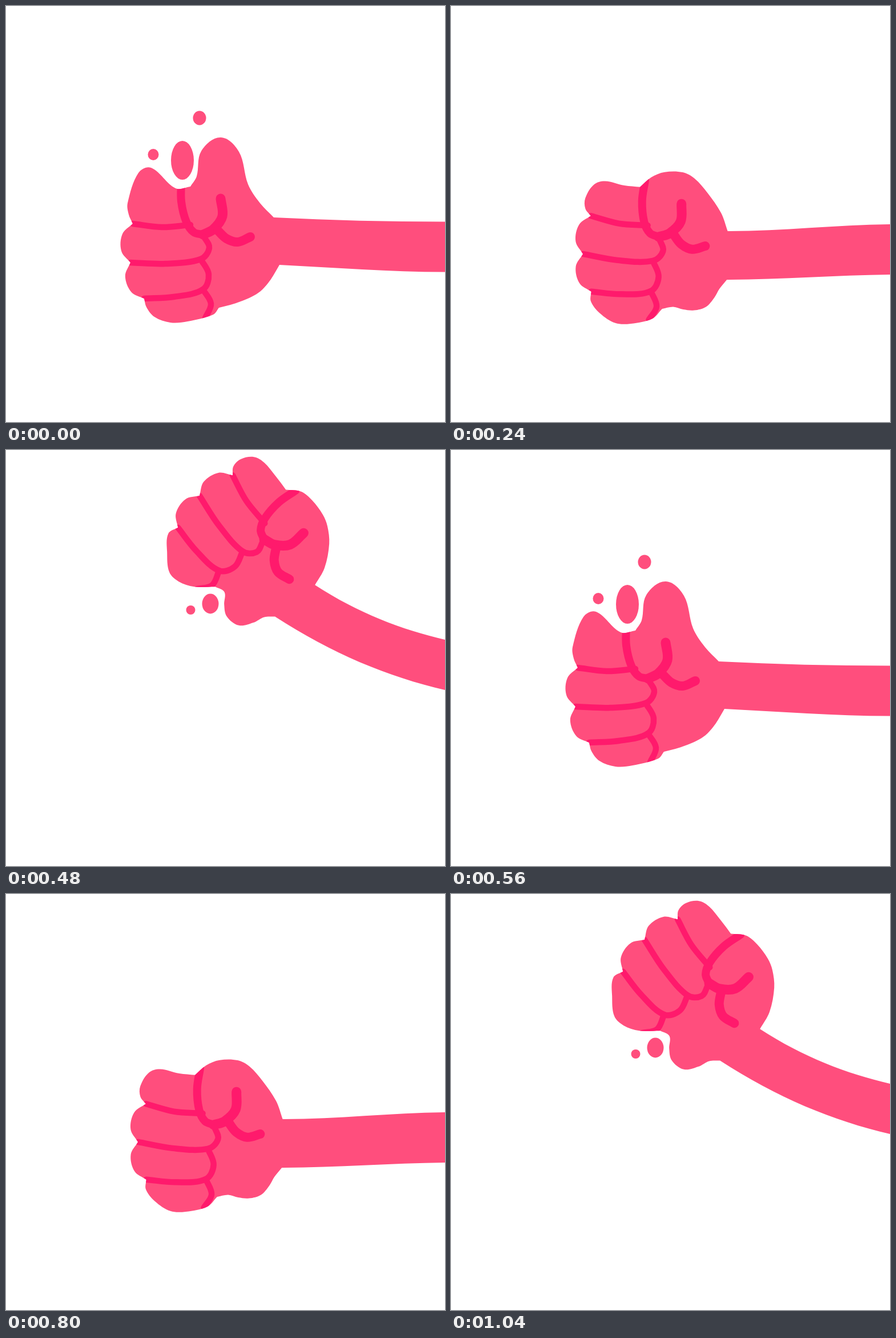
Write an HTML page with a canvas that moves like this. It is 769 px wide and 728 px high and loops after 1.12 s.

```html
<!DOCTYPE html>
<html lang="en">
<head>
<meta charset="utf-8">
<title>Shaking fist</title>
<style>
  html, body { margin: 0; width: 100%; height: 100%; overflow: hidden; background: #fff; }
  canvas { display: block; }
</style>
</head>
<body>
<canvas id="stage" width="769" height="728"></canvas>
<script>
const ctx = document.getElementById('stage').getContext('2d');
const W = 769, H = 728, STEP = 80, ARM = 44;
const SKIN = '#ff4e7d', CREASE = '#ff1a6c';

const lerp = (a, b, k) => a + (b - a) * k;
const between = (a, b, k) => [lerp(a[0], b[0], k), lerp(a[1], b[1], k)];
const shift = ([x, y], dx, dy) => [x + dx, y + dy];

// The fist is described around the root of the thumb.
// Soft points are [x, y, dx, dy]: a place and how far it stretches.
const THUMB = [
  [117, -27, 7, -3], [102, -58, -2, 3], [72, -89, 7, 1], [45, -104, 18, -41],
  [24, -109, 7, -61], [-7, -108, 4, -38], [-31, -101, 20, -1], [-49, -81, 27, -3]
];
const INDEX = [
  [-77, -80, 29, -1], [-110, -77, 19, -40], [-128, -68, 15, -40],
  [-138, -47, 6, -8], [-135, -29, 5, -6]
];
const PINKY = [
  [-99, 127, -5, 5], [-85, 144, 6, 8], [-57, 154, 9, 15],
  [-27, 152, 2, 13], [18, 140, -20, 8], [28, 128, -9, -10]
];
const HEEL = [
  [48, 123, -12, -13], [66, 117, -12, 6], [85, 109, -12, 22], [101, 99, -3, 24],
  [114, 85, -5, 14], [123, 72, -11, 6], [134, 53, -12, 9]
];
const stretch = (points, k) => points.map(([x, y, dx, dy]) => [x + dx * k, y + dy * k]);

// Finger creases run from the knuckles on the outline to the folds in the palm.
const KNUCKLES = [[-123, -19], [-127, 49], [-103, 112]];
const FOLDS = [[-22, -17], [-4, 43], [0, 96]];
const PINKY_END = [4, 146];

function fingertip(a, b) {
  const dx = b[0] - a[0], dy = b[1] - a[1], d = 17 / Math.hypot(dx, dy);
  return [...[0.28, 0.72].map(k => shift(between(a, b, k), -dy * d, dx * d)), b];
}

const hook = (a, b) => [a, shift(between(a, b, 0.5), 12, 0), b];
const fingerCreases = KNUCKLES.map((k, i) => {
  const fold = FOLDS[i];
  const line = [k, shift(between(k, fold, 0.5), 0, 5)];
  return [...line, ...(i ? hook(fold, i > 1 ? FOLDS[1] : [2, 4]) : [fold])];
});

const CREASES = [
  { width: 14, points: [[-38, -94], [-38, -58], [-29, -22], [-16, -4], [0, 0]] },
  { width: 17, points: [[0, 0], [18, -9], [34, -32], [31, -63]] },
  { width: 16, points: [[26, -7], [41, 7], [61, 13], [83, 4]] },
  ...[...fingerCreases, hook(FOLDS[2], PINKY_END)].map(points => ({ width: 10.5, points }))
];

// x, y, turn: place of the fist; arm: height at the stage edge;
// wrist, edge: slopes of the arm at its ends; pull, drip: stretch of the top and the heel
const falling = {
  x: 345, y: 400, turn: 0, arm: 421.5, wrist: 0.05, edge: 0, pull: 1, drip: 0,
  drops: [[339, 196, 11.5, 12.5], [258, 260, 9.5, 10], [309, 270, 20, 34]]
};
const low = {
  x: 345, y: 480, turn: -8, arm: 430.5, wrist: -0.2, edge: -0.06, pull: 0.25, drip: 0, drops: []
};
const rising = {
  x: 390, y: 299, turn: 31, arm: 420, wrist: 0.28, edge: 0.06, pull: 0, drip: 1,
  drops: [[337, 450, 25.5, 30]]
};
const high = {
  x: 452, y: 156, turn: 55, arm: 376, wrist: 0.65, edge: 0.23, pull: 0, drip: 1,
  drops: [[358, 269, 14.5, 17.5], [323.5, 280, 8, 8]]
};

function mix(a, b, k) {
  const pose = {};
  for (const key in a) if (key !== 'drops') pose[key] = lerp(a[key], b[key], k);
  pose.drops = a.drops.map((d, i) => d.map((v, j) => lerp(v, b.drops[i][j], k)));
  return pose;
}

const poses = [
  falling,
  low,
  { ...low, x: low.x - 5, y: low.y + 11 },
  mix(low, rising, 0.42),
  rising,
  mix(rising, high, 0.6),
  high
];

const unit = (a, b) => {
  const x = b[0] - a[0], y = b[1] - a[1], d = Math.hypot(x, y) || 1;
  return [x / d, y / d];
};

// Smooth curve through the points, starting at the path's current point
function curve(path, pts) {
  const at = i => pts[Math.max(0, Math.min(pts.length - 1, i))];
  for (let i = 0; i < pts.length - 1; i++) {
    const a = at(i), b = at(i + 1);
    const h = Math.hypot(b[0] - a[0], b[1] - a[1]) / 3;
    const s = unit(at(i - 1), b), e = unit(a, at(i + 2));
    path.bezierCurveTo(a[0] + s[0] * h, a[1] + s[1] * h, b[0] - e[0] * h, b[1] - e[1] * h, ...b);
  }
}

function armSide(path, from, to, slopeFrom, slopeTo) {
  const h = (to[0] - from[0]) / 3;
  path.bezierCurveTo(from[0] + h, from[1] + h * slopeFrom, to[0] - h, to[1] - h * slopeTo, ...to);
}

function bodyPath(pose, place) {
  const path = new Path2D();
  const [k1, k2, k3] = KNUCKLES;
  const parts = [
    stretch(THUMB, pose.pull),
    [...stretch(INDEX, pose.pull), k1],
    fingertip(k1, k2),
    fingertip(k2, k3),
    stretch(PINKY, pose.drip),
    stretch(HEEL, pose.drip)
  ].map(part => part.map(place));

  const top = parts[0][0], bottom = parts.at(-1).at(-1);
  path.moveTo(...top);
  // Each part starts where the previous one ended; the joints are corners.
  parts.forEach((part, i) => curve(path, i ? [parts[i - 1].at(-1), ...part] : part));
  armSide(path, bottom, [W, pose.arm + ARM], pose.wrist, pose.edge);
  path.lineTo(W, pose.arm - ARM);
  armSide(path, [W, pose.arm - ARM], top, pose.edge, pose.wrist);
  return path;
}

function draw(pose) {
  const angle = pose.turn * Math.PI / 180, c = Math.cos(angle), s = Math.sin(angle);
  const place = ([x, y]) => [pose.x + x * c - y * s, pose.y + x * s + y * c];

  ctx.fillStyle = '#fff';
  ctx.fillRect(0, 0, W, H);

  ctx.fillStyle = SKIN;
  const body = bodyPath(pose, place);
  ctx.fill(body);
  for (const drop of pose.drops) {
    ctx.beginPath();
    ctx.ellipse(...drop, 0, 0, 2 * Math.PI);
    ctx.fill();
  }

  ctx.save();
  ctx.clip(body);
  ctx.strokeStyle = CREASE;
  ctx.lineCap = ctx.lineJoin = 'round';
  for (const { width, points } of CREASES) {
    const path = new Path2D(), placed = points.map(place);
    path.moveTo(...placed[0]);
    curve(path, placed);
    ctx.lineWidth = width;
    ctx.stroke(path);
  }
  ctx.restore();
}

const start = performance.now();
function frame() {
  const step = Math.floor((performance.now() - start) / STEP);
  draw(poses[step % poses.length]);
  requestAnimationFrame(frame);
}
frame();
</script>
</body>
</html>
```
